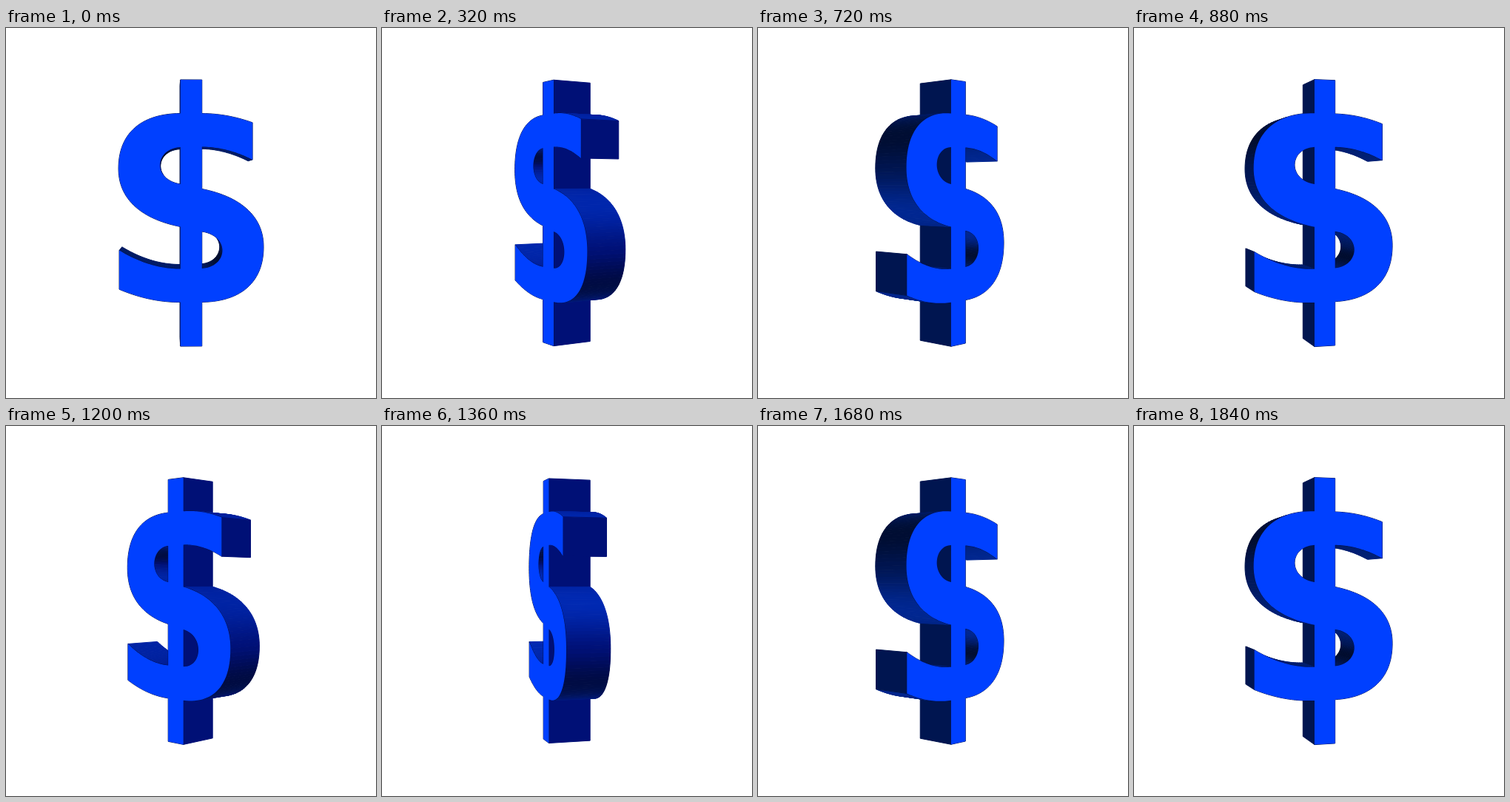
Recreate the animation shown at these times as an HTML page with a canvas. Size 500 by 500 pixels, loop 1920 ms.

```html
<!DOCTYPE html>
<html lang="en">
<head>
<meta charset="utf-8">
<title>Turning dollar sign</title>
<style>
  html, body { margin: 0; width: 100%; height: 100%; overflow: hidden; background: #fff; }
  canvas { display: block; width: 500px; height: 500px; }
</style>
</head>
<body>
<canvas id="stage" width="500" height="500"></canvas>
<script>
const ctx = document.getElementById('stage').getContext('2d');
const AXIS_X = 249.5, HORIZON_Y = 212;
const GLYPH_Y = 243;  // point the S is symmetric about
const BAR = 14.5;     // half the bar's width
const DEPTH = 29.5;   // half the thickness
const EYE = 1080;     // viewing distance
const STEP_MS = 80, STEP_DEG = 15, START_DEG = -1.5;
const PARTS = 28;     // pieces per curve

const sample = fn => Array.from({ length: PARTS + 1 }, (_, i) => fn(i / PARTS));

const cubic = (...keys) => sample(t => {
  const u = 1 - t, weights = [u * u * u, 3 * u * u * t, 3 * u * t * t, t * t * t];
  return [0, 1].map(axis => keys.reduce((sum, key, i) => sum + key[axis] * weights[i], 0));
});

// Parabola from the bar out to the end of an arm
const arm = (reach, top, bend) => sample(t => {
  const run = (reach - BAR) * t;
  return [BAR + run, top + bend * run * run];
});

// Upper half of the sign, clockwise; the lower half is this turned by 180 degrees
const half = (reach, tip) => [
  ...cubic([-BAR, 25.5], [-62, 16], [-98, -8], [-98, -53]),
  ...cubic([-98, -53], [-98, -102], [-66, -127], [-BAR, -127.5]),
  [-BAR, -tip], [BAR, -tip],
  ...arm(reach, -127.5, 0.0026),
  ...arm(reach, -82.5, 0.0037).reverse()
];
const hole = cubic([-BAR, -82], [-50, -80], [-53, -38], [-BAR, -32]);
const flip = points => points.map(([x, y]) => [-x, -y]);

const contours = [[...half(83, 173), ...flip(half(97, 187))], hole, flip(hole)]
  .map(points => points.map(([x, y]) => [x, y + GLYPH_Y - HORIZON_Y]));

const walls = contours.flatMap(points => points.map((a, i) => {
  const b = points[(i + 1) % points.length];
  const dx = b[0] - a[0], dy = b[1] - a[1], len = Math.hypot(dx, dy);
  return { a, b, len, nx: dy / len, ny: -dx / len };
})).filter(wall => wall.len > 0.01);

function wallColor({ nx, ny }, sin) {
  const base = sin > 0 ? [0, 16, 118] : [0, 21, 80];
  const bright = [0, 60, 225];
  const tilt = nx * ny;
  const dim = 1 - 1.2 * Math.max(0, tilt);
  const lift = ny * ny * (0.15 + 0.15 * Math.abs(sin)) + 0.8 * Math.abs(sin) * Math.max(0, -tilt);
  return `rgb(${base.map((v, i) => Math.round(v * dim * (1 - lift) + bright[i] * lift))})`;
}

function trace(points) {
  points.forEach(([x, y], i) => i ? ctx.lineTo(x, y) : ctx.moveTo(x, y));
  ctx.closePath();
}

function draw(deg) {
  const angle = deg * Math.PI / 180, cos = Math.cos(angle), sin = Math.sin(angle);
  const turn = ([x, y], z) => [x * cos - z * sin, y, x * sin + z * cos];
  const project = (p, depth) => {
    const [x, y, z] = turn(p, depth);
    const scale = (EYE - DEPTH) / (EYE - z);
    return [AXIS_X + x * scale, HORIZON_Y + y * scale];
  };

  ctx.fillStyle = '#fff';
  ctx.fillRect(0, 0, 500, 500);
  ctx.lineJoin = 'round';
  ctx.lineWidth = 1;

  const visible = [];
  for (const wall of walls) {
    const { a, b, nx, ny } = wall;
    const [x, y, z] = turn([(a[0] + b[0]) / 2, (a[1] + b[1]) / 2], 0);
    if (-nx * cos * x - ny * y + nx * sin * (EYE - z) > 0) visible.push({ wall, z });
  }
  visible.sort((p, q) => p.z - q.z);

  for (const { wall } of visible) {
    const { a, b } = wall;
    ctx.beginPath();
    trace([project(a, DEPTH), project(b, DEPTH), project(b, -DEPTH), project(a, -DEPTH)]);
    ctx.fillStyle = ctx.strokeStyle = wallColor(wall, sin);
    ctx.fill();
    ctx.stroke();
  }

  // Front face with a hairline dark rim
  ctx.beginPath();
  for (const points of contours) trace(points.map(p => project(p, DEPTH)));
  ctx.strokeStyle = '#001050';
  ctx.stroke();
  ctx.fillStyle = '#0040ff';
  ctx.fill('evenodd');
}

const began = performance.now();
let shown = -1;

function tick() {
  const step = Math.floor(Math.max(0, performance.now() - began) / STEP_MS) % (180 / STEP_DEG);
  if (step !== shown) {
    shown = step;
    draw((step * STEP_DEG + START_DEG + 90) % 180 - 90);
  }
  requestAnimationFrame(tick);
}
tick();
</script>
</body>
</html>
```
